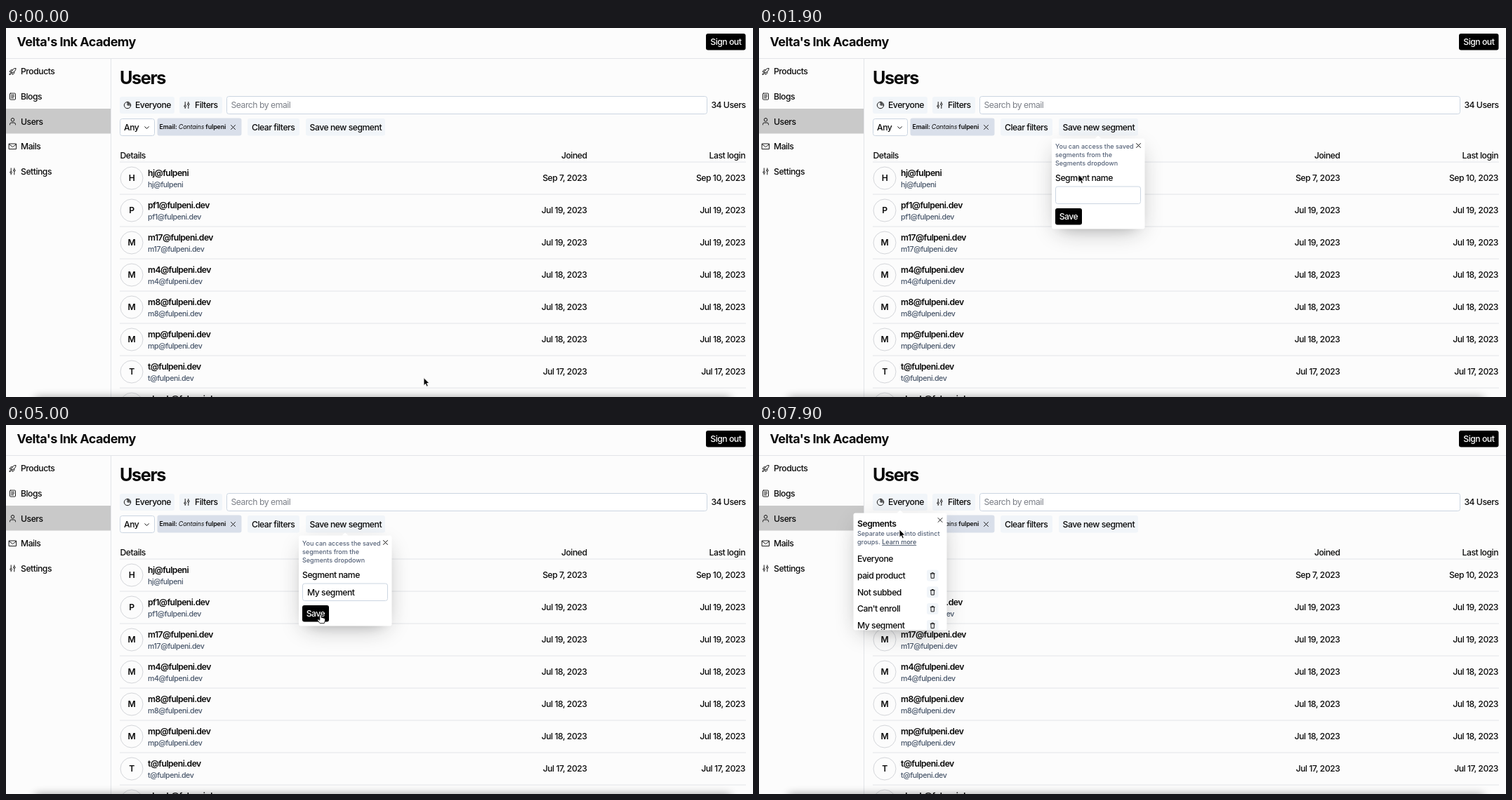
Animation, 1064 px wide and 526 px high, one loop 8 s. Source, as an HTML page:

```html
<!DOCTYPE html>
<html lang="en">
<head>
<meta charset="utf-8">
<title>Users</title>
<style>
  html, body { margin: 0; width: 100%; height: 100%; overflow: hidden; background: #fcfcfc; }
  svg { display: block; }
  text { font: 500 12.2px Inter, "Liberation Sans", sans-serif; letter-spacing: -.039em; fill: #0a0a0a; white-space: pre; }
  .title { font-size: 18px; font-weight: 700; letter-spacing: -.03em; }
  .h1 { font-size: 25.2px; font-weight: 700; letter-spacing: -.055em; }
  .reg { font-weight: 450; }
  .semi { font-weight: 600; }
  .name { font-weight: 600; letter-spacing: -.046em; }
  .sub { font-size: 10.6px; font-weight: 450; fill: #475569; }
  .chip { font-size: 8.8px; font-weight: 600; letter-spacing: -.01em; }
  .chip .i { font-weight: 450; font-style: italic; }
  .help { font-size: 9px; font-weight: 450; letter-spacing: 0; fill: #556278; }
  .link { fill: #475569; text-decoration: underline; }
  .hint { font-weight: 400; fill: #7b7f87; }
  .end { text-anchor: end; }
  .mid { text-anchor: middle; }
  .inv { fill: #fff; }
  .btn { fill: #f1f5f9; }
  .box { fill: #fff; stroke: #cbd5e1; }
  .line { stroke: #e2e4e8; }
  .ico { fill: none; stroke: #1a1a1a; stroke-width: 1; stroke-linecap: round; stroke-linejoin: round; }
  .wide { fill: #161718; opacity: .35; filter: blur(17px); }
  .near { fill: #161718; opacity: .2; filter: blur(9px); }
  .foot { opacity: .42; filter: blur(6.5px); }
  .cur { stroke: #fff; stroke-width: .9; stroke-linejoin: round; }
  #hand { fill: #fff; stroke: #111; }
</style>
</head>
<body>
<svg id="stage" width="1064" height="526" viewBox="0 0 1064 526"></svg>
<script>
const stage = document.getElementById('stage');

// y is the vertical middle of the line
const text = (x, y, s, cls = '', id = '') =>
  `<text x="${x}" y="${y}" dy=".355em" class="${cls}" id="${id}">${s}</text>`;
const rect = (x, y, w, h, cls, id = '', r = 3) =>
  `<rect x="${x}" y="${y}" width="${w}" height="${h}" rx="${r}" class="${cls}" id="${id}"/>`;
const line = (x1, y1, x2, y2, cls = 'line') =>
  `<line x1="${x1}" y1="${y1}" x2="${x2}" y2="${y2}" class="${cls}"/>`;
const icon = (x, y, d) => `<path class="ico" transform="translate(${x} ${y})" d="${d}"/>`;

// icons are drawn around their centre
const ICON = {
  rocket: 'M-2 1 C-1-2 1-4.6 4.6-4.6 C4.6-1 2 1 -1 2ZM-2 1 L-4.4 .3 L-2.6-2.2 L-.4-2.2M-1 2 L-.3 4.4 L2.2 2.6 L2.2 .4M-3 2.2 Q-4.8 2.8-4.6 4.6 Q-2.8 4.8-2.2 3',
  page: 'M-3-4.5 H3 Q4-4.5 4-3.5 V3.5 Q4 4.5 3 4.5 H-3 Q-4 4.5-4 3.5 V-3.5 Q-4-4.5-3-4.5ZM-2-2 H2M-2 0 H2M-2 2 H1',
  user: 'M0-4.7 A2.3 2.3 0 1 1 0-.1 A2.3 2.3 0 1 1 0-4.7M-4 4.7 V4 Q-4 1.8-1.8 1.8 H1.8 Q4 1.8 4 4 V4.7',
  mail: 'M-5-3.8 H5 V3.8 H-5ZM-5-3 L0 .8 L5-3',
  sliders: 'M-2.3-4.5 V-.2M-2.3 2.8 V4.5M2.3-4.5 V-2.8M2.3 .2 V4.5M-3.6 1.3 A1.3 1.3 0 1 1 -1 1.3 A1.3 1.3 0 1 1 -3.6 1.3M1-1.3 A1.3 1.3 0 1 1 3.6-1.3 A1.3 1.3 0 1 1 1-1.3',
  pie: 'M0-4.7 A4.7 4.7 0 1 0 4.7 0 A4.7 4.7 0 0 0 0-4.7 V0 H4.7M1.2-3.2 V-1.2 H3.2 Q2.8-2.8 1.2-3.2',
  down: 'M-2.8-1.3 L0 1.5 L2.8-1.3',
  close: 'M-3-3 L3 3M3-3 L-3 3',
  trash: 'M-3-2.6 H3M-1.2-2.6 V-3.8 H1.2 V-2.6M-2.3-2.6 L-2.1 3.8 H2.1 L2.3-2.6'
};

const menu = [['Products', 'rocket'], ['Blogs', 'page'], ['Users', 'user'], ['Mails', 'mail'], ['Settings', 'sliders']];
const host = 'fulpeni';
const users = [
  ['hj', 'Sep 7, 2023', 'Sep 10, 2023', ''],
  ['pf1', 'Jul 19, 2023'], ['m17', 'Jul 19, 2023'], ['m4', 'Jul 18, 2023'], ['m8', 'Jul 18, 2023'],
  ['mp', 'Jul 18, 2023'], ['t', 'Jul 17, 2023'], ['shenk', 'Jul 17, 2023']
];

const userRow = ([name, joined, login = joined, tld = '.dev'], i) => {
  const y = 214 + 46 * i, mail = `${name}@${host}${tld}`;
  return `<circle cx="179" cy="${y}" r="16" fill="#fcfcfc" stroke="#d4d6da"/>` +
    text(179, y, name[0].toUpperCase(), 'mid semi') +
    text(202, y - 7, mail, 'name') + text(202, y + 9, mail, 'sub') +
    text(827.5, y, joined, 'end reg') + text(1053, y, login, 'end reg') +
    line(162, y + 23, 1054, y + 23);
};

const sidebar = rect(0, 115, 149, 35.5, '', 'active', 0) +
  menu.map(([s, k], i) => icon(9.5, 62 + 35.6 * i, ICON[k]) + text(21, 62 + 35.6 * i, s)).join('');

const toolbar =
  rect(162, 98, 78, 24, 'btn', 'everyone') + icon(173, 110, ICON.pie) + text(184, 110, 'Everyone') +
  rect(247, 98, 61, 24, 'btn') + icon(257.5, 110, ICON.sliders) + text(269, 110, 'Filters') +
  rect(314.5, 97.5, 684, 25, 'box') + text(320.5, 110, 'Search by email', 'hint') +
  text(1053.5, 110, '34 Users', 'end') +
  rect(162.5, 129.5, 49, 24, 'box') + text(168, 141.5, 'Any') + icon(200.5, 142, ICON.down) +
  rect(215.5, 128.5, 120, 25, '', 'chip') +
  text(218.5, 141, `Email: <tspan class="i">Contains</tspan> ${host}`, 'chip') + icon(323.5, 141.5, ICON.close) +
  rect(344, 129, 74, 24.5, 'btn') + text(350, 141.5, 'Clear filters') +
  rect(427, 129, 113, 24.5, 'btn', 'newSeg') + text(432.5, 141.5, 'Save new segment');

const card = (x, y, w, h, tip) =>
  rect(x + 9, y + 18, w - 18, h - 18, 'wide') + rect(x + 13, y + 22, w - 26, h - 26, 'near') +
  rect(x, y, w, h, 'inv') + `<path fill="#fff" d="M${tip - 4.5} ${y} l4.5-4 l4.5 4Z"/>`;

const savePop = `<g id="savePop">` + card(417, 157.5, 132.5, 129, 483) +
  ['You can access the saved', 'segments from the', 'Segments dropdown']
    .map((s, i) => text(422, 169 + 12 * i, s, 'help')).join('') +
  icon(540.5, 167.5, ICON.close) + text(422, 214, 'Segment name') +
  rect(422.5, 226, 121, 24.5, 'box', 'field') + text(429, 238.5, '', 'reg', 'typed') +
  rect(429, 232, 1.7, 13, '', 'caret', 0) +
  rect(422, 257, 38, 23.5, '', 'save') + text(441, 269, 'Save', 'mid inv') + '</g>';

const listPop = `<g id="listPop">` + card(134.5, 125.5, 133, 167, 201) +
  icon(258, 135.5, ICON.close) + text(140, 140.5, 'Segments', 'semi') +
  text(140, 155, 'Separate users into distinct', 'help') +
  text(140, 167, 'groups. <tspan class="link">Learn more</tspan>', 'help') +
  text(140, 191, 'Everyone') +
  `<clipPath id="cut"><rect x="134" y="126" width="134" height="166"/></clipPath><g clip-path="url(#cut)">` +
  ['paid product', 'Not subbed', "Can't enroll", 'My segment'].map((s, i) => {
    const y = 214.5 + 23.8 * i;
    return text(140, y, s, 'reg') + rect(239, y - 8, 16.5, 16, 'btn') + icon(247.2, y, ICON.trash);
  }).join('') + '</g></g>';

const cursor = `<g id="cursor">
  <path id="arrow" class="cur" d="M0 0 V11.2 L2.6 8.8 L4.3 12.7 L6.3 11.8 L4.6 8 H8Z"/>
  <path id="hand" class="cur" d="M-1.2 1 Q0-.8 1.2 1 V4.4 Q2.4 3.8 3 4.9 Q4.3 4.3 4.9 5.5 Q6.4 5.2 6.5 6.7 V9 L5.2 12.6 H-.8 L-4.2 8.2 Q-4.6 6.4-2.8 6.9 L-1.2 8.2Z"/>
  <path id="beam" class="ico" d="M-2-6 Q0-6 0-4.8 Q0-6 2-6M0-4.8 V4.8M-2 6 Q0 6 0 4.8 Q0 6 2 6"/>
</g>`;

stage.innerHTML =
  text(15.5, 20, "Velta's Ink Academy", 'title') +
  rect(997, 8, 56.5, 23.5, '', 'signOut') + text(1025.3, 20, 'Sign out', 'mid inv') +
  line(0, 43.5, 1064, 43.5) + line(149.5, 44, 149.5, 526) + sidebar +
  text(162, 71, 'Users', 'h1') + toolbar +
  text(162.5, 181.5, 'Details') + text(827.5, 181.5, 'Joined', 'end') + text(1053, 181.5, 'Last login', 'end') +
  line(162, 191, 1054, 191) + users.map(userRow).join('') +
  rect(42, 527, 990, 30, 'foot') + savePop + listPop + cursor;

const $ = id => document.getElementById(id);
const paint = (id, color) => { $(id).style.fill = color; };
const show = (id, on) => { $(id).style.display = on ? '' : 'none'; };
paint('active', '#c9c9c9');
paint('chip', '#d9dfea');
paint('caret', '#3f7fe0');

// pointer stops: time, x, y
const stops = [
  [0, 595, 498.5], [300, 523, 185], [400, 523, 185], [900, 479, 144], [1400, 479, 144],
  [2200, 444, 239], [3900, 444, 239], [4300, 433, 281], [4500, 434, 302], [4800, 448, 270],
  [5900, 448, 271], [6000, 448, 271], [6500, 283, 165], [6600, 283, 165],
  [7200, 203, 109], [7700, 203, 109], [7900, 200, 149], [8000, 200, 149]
];
const keys = [2500, 2600, 2800, 3000, 3000, 3100, 3300, 3400, 3500, 3600];
const phrase = 'My segment';

function pointer(t) {
  const i = stops.findIndex(s => s[0] > t);
  const [t0, x0, y0] = stops[i - 1], [t1, x1, y1] = stops[i];
  const u = (t - t0) / (t1 - t0), k = u * u * (3 - 2 * u);
  return [x0 + (x1 - x0) * k, y0 + (y1 - y0) * k];
}

function draw(t) {
  const [x, y] = pointer(t);
  const over = (l, top, r, b) => x > l && x < r && y > top && y < b;
  const saving = t >= 1100 && t < 5300, listing = t >= 7400;
  const onNew = over(427, 129, 540, 153.5);
  const onAll = over(162, 98, 240, 122);
  const onField = saving && over(422, 226, 544, 251);
  const onSave = saving && over(422, 257, 460, 280.5);
  const shade = (on, pressed) => !on ? '#f1f5f9' : pressed ? '#c0c8d4' : '#dbe1ea';

  paint('newSeg', shade(onNew, t === 1000));
  paint('everyone', shade(onAll, t === 7300));
  paint('save', t === 4900 ? '#2a2a2a' : '#000');
  $('field').style.stroke = onField ? '#94a3b8' : '#cbd5e1';
  show('savePop', saving);
  show('listPop', listing);

  const count = keys.filter(k => k <= t).length;
  $('typed').textContent = phrase.slice(0, count).replace(/ $/, '\u00a0');
  if (saving) $('caret').setAttribute('x', 429 + (count ? $('typed').getComputedTextLength() : 0));
  const dim = t >= 1700 && t < 2200 || t >= 4900;
  $('caret').style.opacity = dim ? 0 : t >= 4100 && t < 4600 ? .2 : count ? .7 : 1;

  const hand = onNew || onAll || onSave;
  show('hand', hand);
  show('beam', onField);
  show('arrow', !hand && !onField);
  show('cursor', t < 2500 || t >= 4000);
  $('cursor').setAttribute('transform', `translate(${x} ${y})`);
}

const start = performance.now();
function tick() {
  const t = (performance.now() - start) % 8000;
  draw(Math.floor(t / 100) * 100);
  requestAnimationFrame(tick);
}
tick();
</script>
</body>
</html>
```
